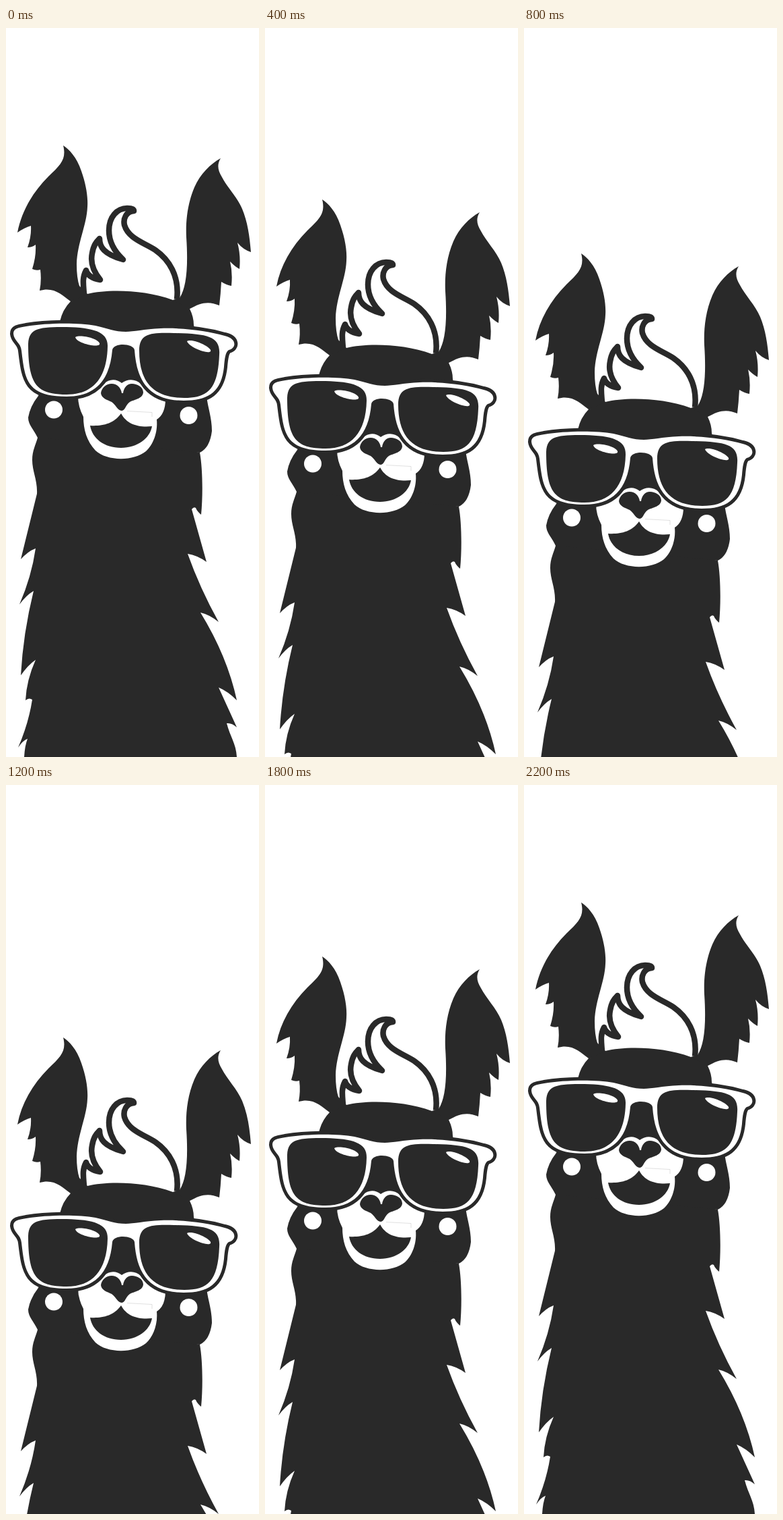
Animation of 376x1080 px, one loop 2.3 s. Source, as an HTML page:

```html
<!DOCTYPE html>
<html lang="en">
<head>
<meta charset="utf-8">
<title>Bobbing llama</title>
<style>
  html, body { margin: 0; width: 100%; height: 100%; overflow: hidden; background: #fff; }
  svg { display: block; width: 376px; height: 1080px; }
  .dark { fill: #292929; }
  .light { fill: #fff; }
  .line { fill: none; stroke: #292929; stroke-width: 8.5; stroke-linejoin: round; }
  .frame { stroke: #292929; stroke-width: 10; paint-order: stroke; }
  .crease { fill: none; stroke: #ccc; stroke-width: .6; }
</style>
</head>
<body>
<svg viewBox="0 0 376 1080">
  <g id="llama">
    <path class="dark" id="neckLeft"/>
    <path class="dark" id="neckRight"/>

    <!-- left ear -->
    <path class="dark" d="M85 174 C94 180 105 191 112 212 C119 232 122 250 121 265
      C120 292 106 318 105 350 Q105 370 109 382 L121 394 V420 L96 405 C83 395 71 383 50 389
      Q53 374 51 358 Q45 360 39 357 Q45 338 44 321 Q39 325 32 325 Q38 309 37 293
      Q27 296 17 303 C23 272 39 244 63 220 C82 202 90 194 85 174 Z"/>

    <!-- right ear -->
    <path class="dark" d="M319 193 C313 203 315 211 321 221 C328 235 344 251 351 268
      C359 287 362 308 364 332 Q352 328 344 318 Q349 337 347 357 Q341 354 333 346
      Q337 362 335 382 Q328 381 320 376 Q319 395 317 411 C301 404 289 407 273 416
      V430 H248 V403 L258 400 C268 385 271 355 268 310 C267 288 269 262 280 236
      C289 216 303 202 319 193 Z"/>

    <!-- head -->
    <path class="dark" d="M96 405 L121 394 C150 387 204 387 248 403 L273 416 Q279 428 279 440
      L298 545 C300 563 306 577 306 597 Q303 622 288 629 L47 607 C41 594 33 588 33 577
      Q36 560 48 545 L80 435 Q84 417 96 405 Z"/>

    <!-- quiff -->
    <path class="line" d="M116 394 C115 380 113 370 119 359 C121 366 128 371 140 373
      C131 362 125 348 128 334 C130 322 134 317 139 312 C139 324 145 335 174 343
      C160 330 153 315 153 300 C153 280 165 267 180 267 Q190 267 190 271
      C178 272 174 283 176 292 C182 312 205 318 222 329 C242 343 258 367 254 402"/>

    <!-- muzzle, nose and mouth -->
    <path class="light" d="M107 545 L146 527 C152 520 164 519 172 526 C181 519 193 520 200 527
      C210 540 225 548 237 549 Q237 572 224 580 C226 600 218 618 208 627
      C190 642 150 642 133 626 C120 612 115 595 115 576 Q107 561 107 545 Z"/>
    <path class="dark" d="M172 541 C171 533 165 527 157 527 C149 527 142 533 141 541
      C142 549 151 551 157 554 C163 558 166 567 172 567 C177 567 178 558 184 554
      C192 550 203 549 204 540 C204 532 195 527 187 527 C180 527 175 533 174 541 Z"/>
    <path class="dark" d="M125 589 C142 590 160 587 171 571 C180 588 198 592 217 590
      C214 608 195 622 171 622 C146 622 128 608 125 589 Z"/>
    <path class="crease" d="M180 567.5 L217 569.5 V576"/>

    <!-- sunglasses -->
    <path class="light frame" d="M11 453 C11 445 18 444 30 442 C60 437 105 436 133 441
      C150 445 162 450 178 450 C190 450 205 446 230 445 C265 444 300 449 325 456
      C343 460 343 474 331 477 C326 480 325 490 324 502 C320 540 300 552 264 552
      C210 552 194 520 191 477 C189 467 160 466 158 477 C154 525 130 546 90 546
      C30 546 28 520 23 478 C22 466 12 464 11 453 Z"/>
    <path class="dark" d="M33 468 C34 444 50 443 90 443 C130 444 152 450 151 472
      C150 520 128 543 90 543 C45 543 33 528 33 468 Z"/>
    <path class="dark" d="M198 478 C198 452 215 451 250 452 C300 453 319 457 317 484
      C315 535 300 548 265 548 C215 548 198 520 198 478 Z"/>
    <path class="light" d="M103 458 C110 454 135 459 139 467 C142 475 105 468 103 458 Z"/>
    <path class="light" d="M269 464 C276 460 300 470 304 477 C307 486 272 474 269 464 Z"/>

    <!-- cheeks -->
    <circle class="light" cx="71" cy="565.5" r="13"/>
    <circle class="light" cx="271.5" cy="574" r="13"/>
  </g>
</svg>
<script>
  const STEP_MS = 100, STEPS = 23, PEAK = 11, STEP_PX = 20;
  const byId = id => document.getElementById(id);

  // Each tuft runs out to a tip, then tucks back in to a notch.
  function fur(x, y, tufts) {
    return tufts.map(([tipX, tipY, notchX, notchY, bend]) => {
      const out = `Q${(x + tipX) / 2 + bend} ${(y + tipY) / 2} ${tipX} ${tipY}`;
      const back = `Q${(tipX + notchX) / 2} ${(tipY + notchY) / 2 - 4} ${notchX} ${notchY}`;
      [x, y] = [notchX, notchY];
      return out + back;
    }).join('');
  }

  byId('neckLeft').setAttribute('d',
    'M200 600 L47 607 C44 618 39 626 39 640 C39 657 47 670 46 690' +
    fur(46, 690, [
      [22, 787, 44, 771, 0],
      [20, 854, 41, 834, 6],
      [22, 959, 44, 936, -6],
      [29, 996, 39, 995, -6],
      [18, 1066, 32, 1053, 5]
    ]) + 'Q28 1063 27 1080 H200 Z');

  byId('neckRight').setAttribute('d',
    'M150 600 L288 629 C292 650 293 690 290 721 Q284 716 282 711 Q279 709 276 713' +
    fur(276, 713, [
      [298, 791, 270, 779, 0],
      [316, 880, 289, 866, -5],
      [343, 996, 316, 977, 13],
      [343, 1036, 328, 1030, 0]
    ]) + 'C333 1050 342 1060 343 1080 H150 Z');

  const llama = byId('llama');
  const start = performance.now();

  // Sinks in hard steps to the lowest point, then rises back the same way.
  function draw() {
    const step = Math.floor((performance.now() - start) / STEP_MS) % STEPS;
    const drop = STEP_PX * (PEAK - Math.abs(step - PEAK));
    llama.setAttribute('transform', `translate(0 ${drop})`);
    requestAnimationFrame(draw);
  }
  draw();
</script>
</body>
</html>
```
